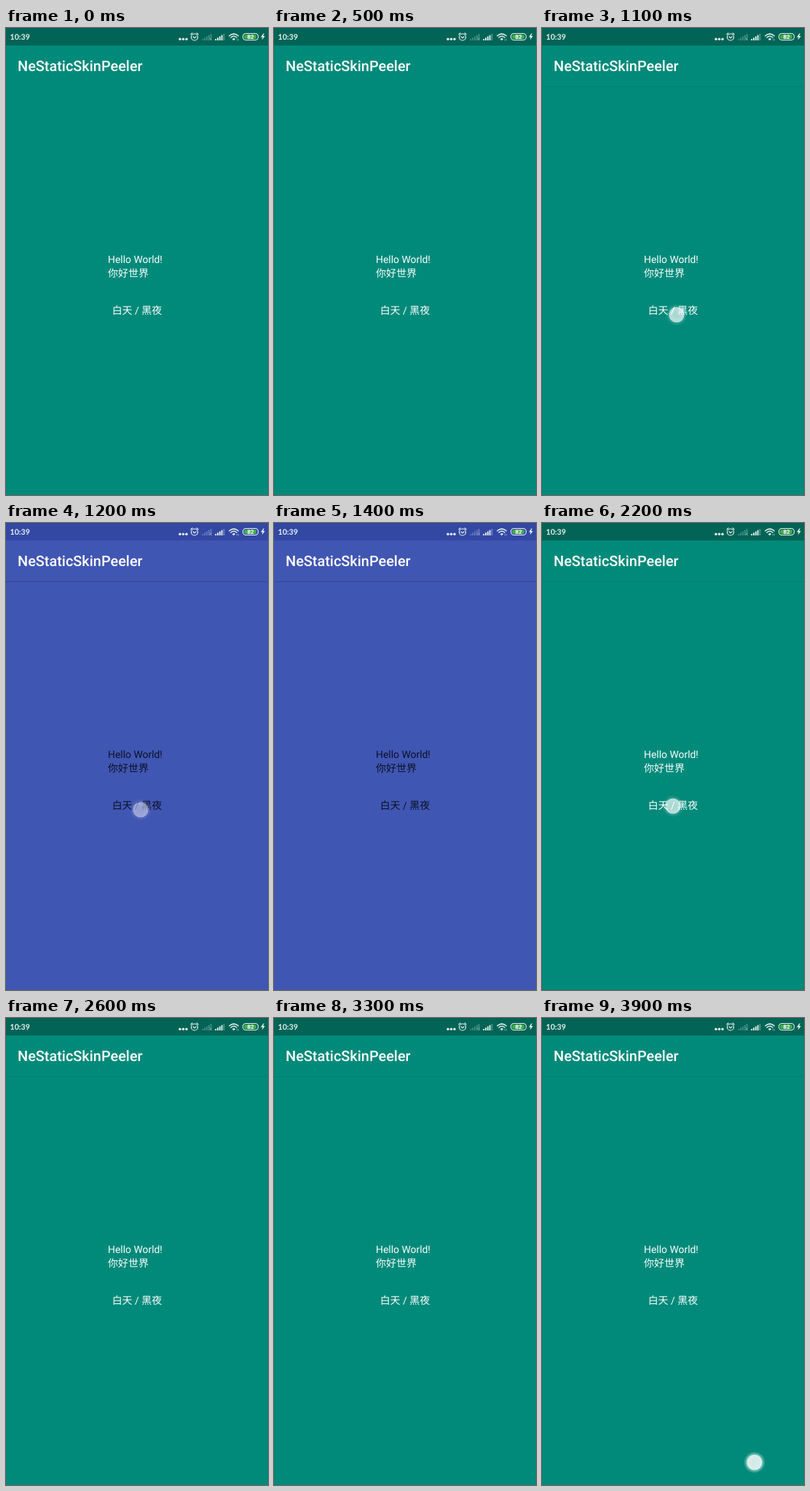
Recreate the animation shown at these times as an HTML page. Size 360x640 px, loop 4000 ms.

```html
<!DOCTYPE html>
<html lang="zh-CN">
<head>
<meta charset="utf-8">
<title>NeStaticSkinPeeler</title>
<style>
  html, body { margin: 0; width: 100%; height: 100%; overflow: hidden; }
  svg {
    --page: #018a7a; --status: #026456; --copy: #fff; --shade: .09;
    display: block; width: 360px; height: 640px; background: var(--page);
  }
  svg.day { --page: #4056b3; --status: #3348a3; --copy: #0c1026; --shade: .2; }
  text {
    font-family: Roboto, "Noto Sans CJK SC", "Noto Sans CJK", sans-serif;
    text-rendering: geometricPrecision;
  }
  .status { fill: var(--status); }
  .shade { opacity: var(--shade); }
  .title { font-size: 19.9px; font-weight: 500; fill: #fff; }
  .copy { font-size: 14px; fill: var(--copy); }
  .clock { font: 700 10.6px Lato, sans-serif; }
  .level { font: 700 8px Roboto, sans-serif; }
  .icons { fill: #e9f3f1; }
  .stroke { fill: none; stroke: #e9f3f1; stroke-linecap: round; }
  .dim { opacity: .28; }
</style>
</head>
<body>
<svg id="stage" viewBox="0 0 360 640">
  <defs>
    <radialGradient id="glow">
      <stop offset=".62" stop-color="#fff" stop-opacity=".6"/>
      <stop offset="1" stop-color="#fff" stop-opacity="0"/>
    </radialGradient>
    <radialGradient id="tip">
      <stop offset=".3" stop-color="#fff" stop-opacity=".56"/>
      <stop offset="1" stop-color="#fff" stop-opacity=".66"/>
    </radialGradient>
  </defs>

  <rect class="status" width="360" height="24"/>
  <rect id="shade" class="shade" y="80" width="360" height="1"/>

  <g class="icons">
    <text class="clock" x="5.5" y="16">10:39</text>
    <g id="dots"></g>
    <g class="stroke" stroke-width="1.2">
      <circle cx="259" cy="12.5" r="4.5"/>
      <path d="M254 8.8l2-1.9M264 8.8l-2-1.9M257.2 12l1.8 1.7 2-1.7"/>
    </g>
    <g id="weak" class="dim"></g>
    <path class="stroke dim" d="M279.5 13.5l3 3m0-3l-3 3"/>
    <g id="strong"></g>
    <g class="stroke" stroke-width="1.5">
      <path d="M306.8 10.8q6.2-5.4 12.4 0M309 13q4-3.4 8 0"/>
      <path d="M311.2 15q1.8-1.5 3.6 0l-1.8 1.7z" fill="#e9f3f1" stroke-width=".6"/>
      <path d="M317.3 15.2v1.8M319.3 15.2v1.8" stroke-width=".8" opacity=".6"/>
    </g>
    <rect class="stroke" x="325.5" y="7.5" width="21" height="9" rx="4.3" stroke-width="1.1"/>
    <rect x="327.2" y="9" width="16.8" height="6" rx="2.8" fill="#45ae4b"/>
    <text class="level" x="336" y="15" text-anchor="middle" fill="#fff">82</text>
    <path d="M353.6 7.6l-3.4 5h2.4l-1 3.9 4.2-5.4h-2.6l1.6-3.5z"/>
  </g>

  <text class="title" x="16" y="59.3">NeStaticSkinPeeler</text>
  <g class="copy">
    <text x="140" y="322" font-size="13.9">Hello World!</text>
    <text x="140" y="341">你好世界</text>
    <text x="180" y="392" text-anchor="middle">白天 / 黑夜</text>
  </g>

  <g id="touch">
    <circle id="halo" r="15" fill="url(#glow)"/>
    <circle r="10.6" fill="url(#tip)"/>
  </g>
</svg>
<script>
const LOOP = 4000, STEP = 100, FADE = 300, PRESS = 200;
const $ = id => document.getElementById(id);

function add(parent, name, attributes) {
  const node = document.createElementNS('http://www.w3.org/2000/svg', name);
  for (const key in attributes) node.setAttribute(key, attributes[key]);
  $(parent).append(node);
}

function addBars(parent, left, lit) {
  for (let i = 0; i < 5; i++) {
    const height = 2 + i * 1.75;
    add(parent, 'rect', { x: left + i * 2.8, y: 17 - height, width: 1.8, height,
                          opacity: i < lit ? 1 : .35 });
  }
}

for (let i = 0; i < 3; i++) add('dots', 'circle', { cx: 239 + i * 4.5, cy: 15.2, r: 1.7 });
addBars('weak', 269.5, 5);
addBars('strong', 287.3, 4);

const taps = [
  { start: 900, end: 1400, x: 185, y: 393 },
  { start: 2000, end: 2500, x: 180, y: 388 },
  { start: 3800, end: 4300, x: 292, y: 609 }
];

function draw(now) {
  const time = Math.floor(now % LOOP / STEP) * STEP;
  $('stage').classList.toggle('day', time >= 1200 && time < 2200);
  $('shade').style.visibility = time < 700 ? 'hidden' : 'visible';

  const tap = taps.find(({ start, end }) => time >= start && time < end);
  $('touch').style.visibility = tap ? 'visible' : 'hidden';
  if (!tap) return;
  $('touch').setAttribute('transform', `translate(${tap.x} ${tap.y})`);
  $('touch').setAttribute('opacity', Math.min(1, (tap.end - time) / FADE));
  $('halo').setAttribute('opacity', time - tap.start < PRESS ? 1 : .4);
}

const begin = performance.now();
function tick() {
  draw(performance.now() - begin);
  requestAnimationFrame(tick);
}
tick();
</script>
</body>
</html>
```
